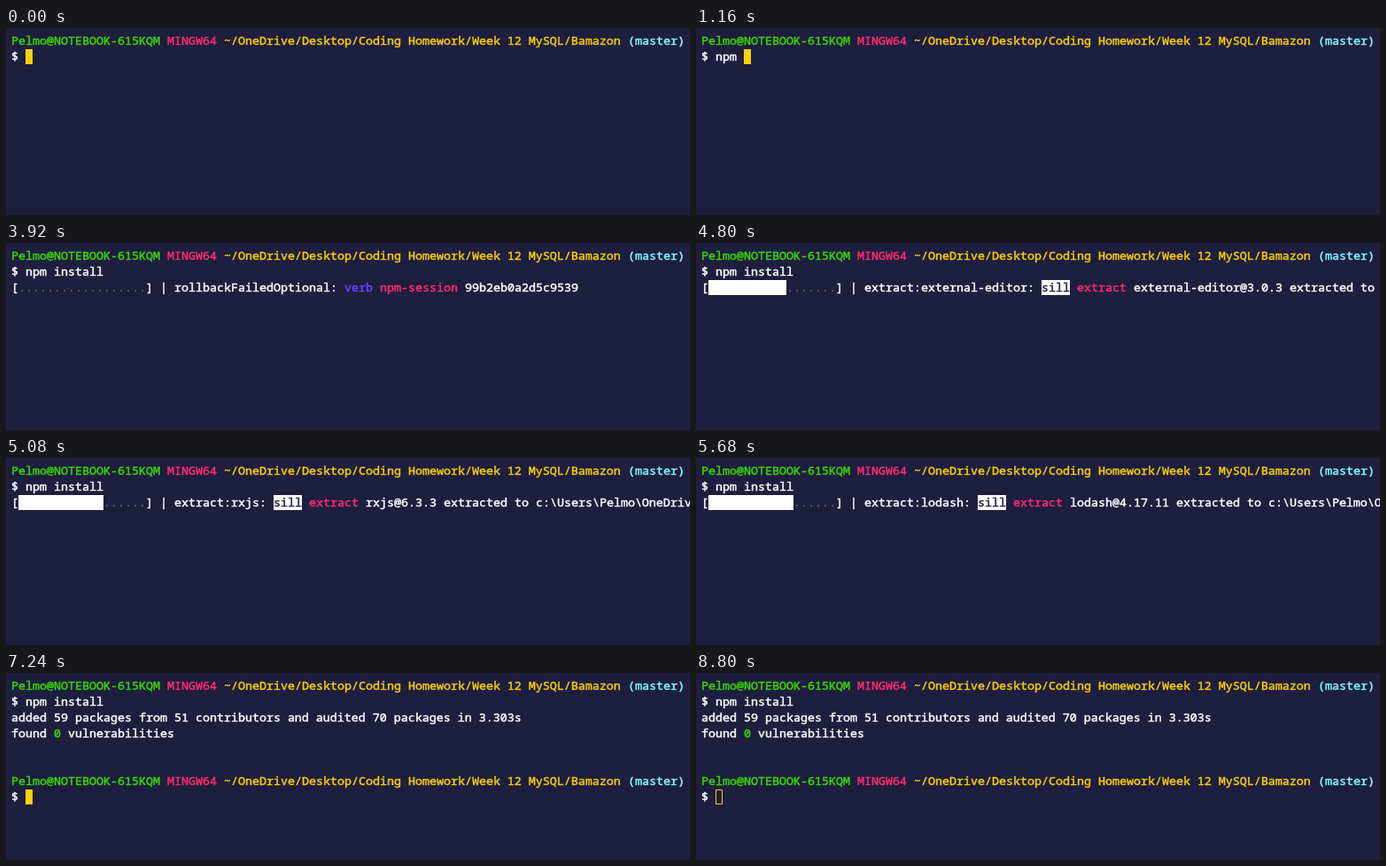
These frames come from a looping animation (772x212 px, 8.84 s). An HTML page with a canvas:

```html
<!DOCTYPE html>
<html lang="en">
<head>
<meta charset="utf-8">
<title>npm install in a terminal</title>
<style>
  html, body { margin: 0; width: 100%; height: 100%; overflow: hidden; background: #1e1e3f; }
  canvas { display: block; }
</style>
</head>
<body>
<canvas id="stage" width="772" height="212"></canvas>
<script>
const LOOP = 8840;
const CELL = 8, ROW = 18, LEFT = 6, TOP = 6, BASELINE = 13;
const BLOCK = ROW - 1, TEXT_WEIGHT = 0.45;
const color = {
  back: '#1e1e3f', white: '#ffffff', green: '#3ad900', pink: '#ff2c70',
  yellow: '#fad000', cyan: '#80fcff', blue: '#6943ff', gray: '#5c5c61'
};
const ctx = document.getElementById('stage').getContext('2d');

const USER = 'Pelmo';
const HOME = `c:\\Users\\${USER}\\OneDrive\\Desktop`;
const PROMPT = [
  [USER + '@NOTEBOOK-615KQM ', color.green],
  ['MINGW64 ', color.pink],
  ['~/OneDrive/Desktop/Coding Homework/Week 12 MySQL/Bamazon ', color.yellow],
  ['(master)', color.cyan]
];

// When each character of the command appears; Enter follows.
const COMMAND = 'npm install';
const KEY_TIMES = [760, 960, 1040, 1120, 1440, 1560, 1720, 1920, 2000, 2160, 2320];
const ENTER = 2640, PROGRESS = 3920, RESULT = 6520, NEW_PROMPT = 6720, BLUR = 8400;

const sill = ['sill', color.back, color.white];
const extracting = (name, version) => [
  [`extract:${name}: `], sill, [' '], ['extract', color.pink],
  [` ${name}@${version} extracted to ${HOME}`]
];

const STEPS = [
  { at: PROGRESS, filled: 0, status: [
    ['rollbackFailedOptional: '], ['verb ', color.blue],
    ['npm-session ', color.pink], ['99b2eb0a2d5c9539']] },
  { at: 4040, filled: 7, status: [
    ['loadDep:figures: '], sill, [' '], ['pacote', color.pink],
    [' range manifest for figures@^2.0.0 fetched']] },
  { at: 4360, filled: 7, status: extracting('inquirer', '6.2.0') },
  { at: 4720, filled: 11, status: extracting('external-editor', '3.0.3') },
  { at: 5000, filled: 12, status: extracting('rxjs', '6.3.3') },
  { at: 5320, filled: 12, status: extracting('lodash', '4.17.11') }
];

function fillCells(row, column, count, paint) {
  ctx.fillStyle = paint;
  ctx.fillRect(LEFT + column * CELL, TOP + row * ROW, count * CELL, BLOCK);
}

// A run is [text, ink, background]; the thin stroke thickens the letters.
function writeLine(row, runs) {
  const y = TOP + row * ROW + BASELINE;
  let column = 0;
  for (const [text, ink = color.white, background] of runs) {
    const x = LEFT + column * CELL;
    if (background) fillCells(row, column, text.length, background);
    ctx.fillStyle = ctx.strokeStyle = ink;
    ctx.lineWidth = TEXT_WEIGHT;
    ctx.fillText(text, x, y);
    ctx.strokeText(text, x, y);
    column += text.length;
  }
}

function drawCursor(row, column, focused = true) {
  if (focused) return fillCells(row, column, 1, color.yellow);
  ctx.strokeStyle = color.yellow;
  ctx.lineWidth = 1;
  ctx.strokeRect(LEFT + column * CELL + 0.5, TOP + row * ROW + 0.5, CELL - 1, BLOCK - 1);
}

function drawProgress(time) {
  const { filled, status } = STEPS.filter(step => step.at <= time).pop();
  writeLine(2, [
    ['['], [' '.repeat(filled), color.white, color.white],
    ['.'.repeat(18 - filled), color.gray], ['] | '], ...status
  ]);
}

function drawResult(time) {
  writeLine(2, [['added 59 packages from 51 contributors and audited 70 packages in 3.303s']]);
  writeLine(3, [['found '], ['0', color.green], [' vulnerabilities']]);
  if (time < NEW_PROMPT) return;
  writeLine(6, PROMPT);
  writeLine(7, [['$ ']]);
  drawCursor(7, 2, time < BLUR);
}

function draw(time) {
  ctx.fillStyle = color.back;
  ctx.fillRect(0, 0, 772, 212);
  ctx.font = '13.333px "Noto Sans Mono", monospace';
  ctx.lineJoin = 'round';
  const typed = KEY_TIMES.filter(at => at <= time).length;
  writeLine(0, PROMPT);
  writeLine(1, [['$ ' + COMMAND.slice(0, typed)]]);
  if (time < ENTER) drawCursor(1, 2 + typed);
  else if (time < PROGRESS) drawCursor(2, 0);
  else if (time < RESULT) drawProgress(time);
  else drawResult(time);
}

const start = performance.now();
function tick() {
  draw((performance.now() - start) % LOOP);
  requestAnimationFrame(tick);
}
tick();
</script>
</body>
</html>
```
